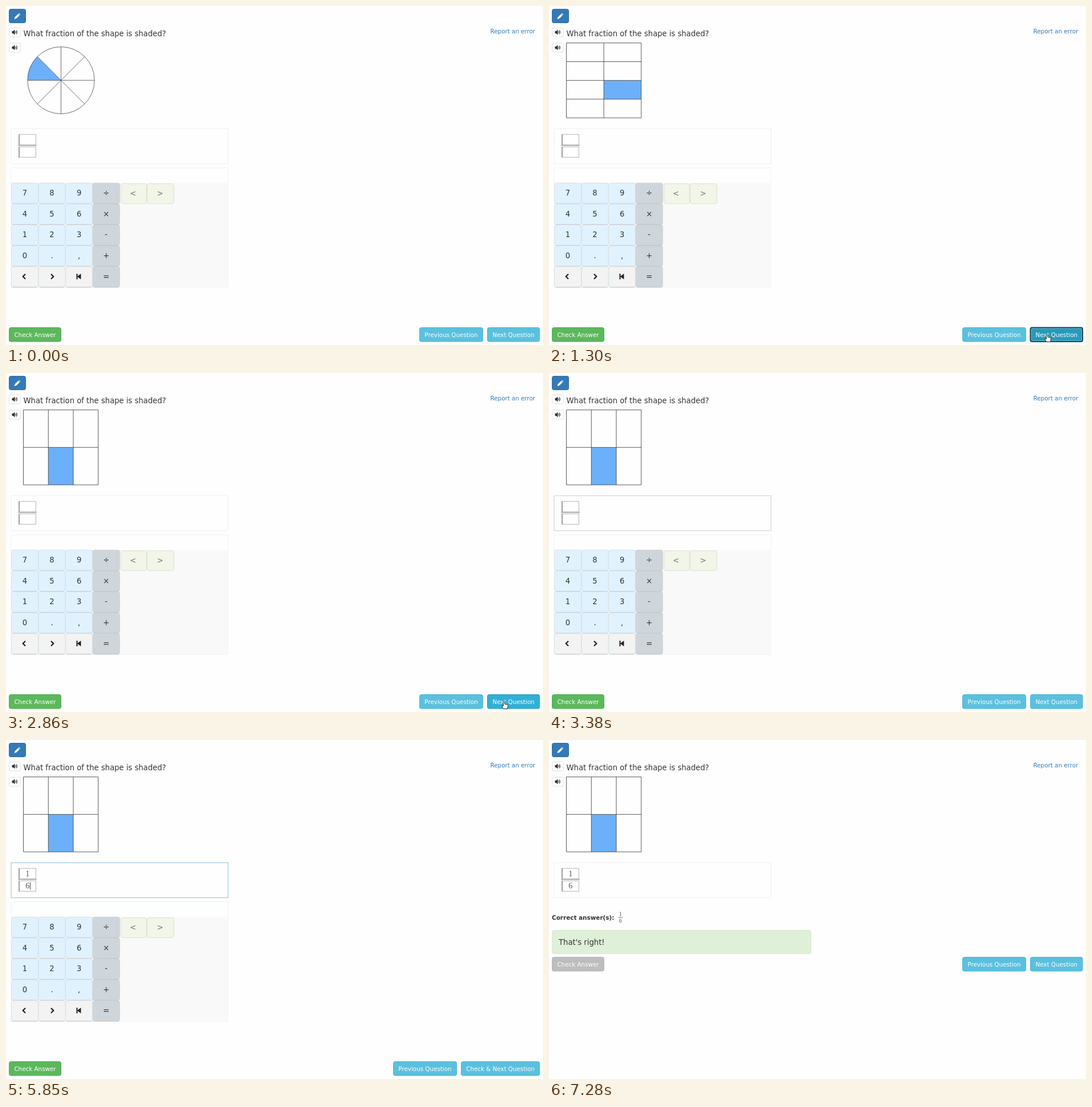
Write an HTML page that moves like this. It is 942x594 px and loops after 7540 ms.

```html
<!DOCTYPE html>
<html lang="en">
<head>
<meta charset="utf-8">
<title>Fraction practice</title>
<style>
  html, body { margin: 0; width: 100%; height: 100%; overflow: hidden; background: #fefefe; }
  svg { display: block; width: 942px; height: 594px; }
  text { font: 13.2px "DejaVu Sans", sans-serif; fill: #333; white-space: pre; }
  .small { font-size: 10.35px; }
  .bold { font-size: 10.45px; font-weight: bold; }
  .math { font-family: "Liberation Serif", serif; font-size: 14px; fill: #555; }
  .tiny { font-size: 10px; }
</style>
</head>
<body>
<svg id="stage" viewBox="0 0 942 594"></svg>
<script>
const LOOP = 7540, STEP = 130;
const stage = document.getElementById('stage');

const rect = (x, y, w, h, fill, stroke = 'none', r = 0, line = 1) =>
  `<rect x="${x}" y="${y}" width="${w}" height="${h}" rx="${r}" fill="${fill}" stroke="${stroke}" stroke-width="${line}"/>`;
const path = (d, fill = 'none', stroke = 'none', line = 1) =>
  `<path d="${d}" fill="${fill}" stroke="${stroke}" stroke-width="${line}" stroke-linejoin="round"/>`;
const text = (s, x, y, cls = '', fill = '', anchor = 'start') =>
  `<text x="${x}" y="${y}" class="${cls}" text-anchor="${anchor}" ${fill && `style="fill:${fill}"`}>${s.replace('&', '&amp;').replace('<', '&lt;')}</text>`;
const centered = (s, x, y, cls, fill) => text(s, x, y, cls, fill, 'middle');
const at = (x, y, body) => `<g transform="translate(${x} ${y})">${body}</g>`;

const INK = '#484848', SHADE = '#6cb0f9';

function pie(parts, shaded) {
  const cx = 96.5, cy = 130.2, r = 58.7;
  const rim = i => {
    const a = i * 2 * Math.PI / parts;
    return `${cx + r * Math.cos(a)} ${cy + r * Math.sin(a)}`;
  };
  let out = path(`M${cx} ${cy}L${rim(shaded)}A${r} ${r} 0 0 1 ${rim(shaded + 1)}Z`, SHADE);
  for (let i = 0; i < parts; i++) out += path(`M${cx} ${cy}L${rim(i)}`, 'none', INK, .8);
  return out + `<circle cx="${cx}" cy="${cy}" r="${r}" fill="none" stroke="${INK}" stroke-width=".8"/>`;
}

function grid(cols, rows, col, row) {
  const x = 30.5, y = 64.7, size = 131.3, w = size / cols, h = size / rows;
  let out = rect(x + col * w, y + row * h, w, h, SHADE);
  for (let i = 0; i <= cols; i++) out += path(`M${x + i * w} ${y}v${size}`, 'none', INK, .9);
  for (let i = 0; i <= rows; i++) out += path(`M${x} ${y + i * h}h${size}`, 'none', INK, .9);
  return out;
}

const SPEAKER = path('M0 -2H2L5 -4.5V4.5L2 2H0Z', '#333') +
  path('M6.2 -2Q7.6 0 6.2 2M7.6 -3.3Q10.2 0 7.6 3.3', 'none', '#333', 1.1);

function header() {
  const pencil = path('M-5 5L-4 1.5L1.6 -4L4.2 -1.4L-1.5 4ZM2.3 -4.7L3.4 -5.5L5.6 -3.3L4.9 -2.1Z', '#fff');
  const sound = y => rect(5.5, y, 20, 16, '#fff', '#e2e2e2', 2.5) + at(10.5, y + 8, SPEAKER);
  return rect(5.5, 5.5, 29, 24, '#337ab7', '#2e6da4', 3) + at(19.5, 18, pencil) +
    sound(38) + sound(65) +
    text('What fraction of the shape is shaded?', 30.5, 52.5) +
    text('Report an error', 849.5, 48.3, 'small', '#337ab7');
}

function answerBox(border, top, bottom, caret) {
  const slot = (y, value) => rect(23, y, 29.3, 18.3, '#fff', '#aaa', 0, .9) +
    path(`M23 ${y}v18.3`, 'none', '#666') + centered(value, 37.7, y + 13.6, 'math');
  const caretX = caret && (caret === 'top' ? top : bottom) ? 42.5 : 37.5;
  return rect(9, 215, 380.5, 61.3, '#fefefe', border) +
    slot(225, top) + slot(246.8, bottom) + path('M21 244.3h33', 'none', '#777', .8) +
    (caret ? path(`M${caretX} ${caret === 'top' ? 227.5 : 249.3}v13`, 'none', '#333', .9) : '');
}

function keypad() {
  let out = rect(9, 283.8, 380.5, 209.7, '#fefefe', '#f1f1f1') + rect(9.5, 310, 380, 183.5, '#f9f9f9');
  ['789÷', '456×', '123-', '0.,+', '   ='].forEach((row, j) => [...row].forEach((label, i) => {
    const x = 9.5 + i * 47.6, y = 310.2 + j * 36.6;
    const fill = i === 3 ? '#cfd6db' : j === 4 ? '#f3f3f3' : '#e0f2fe';
    out += rect(x, y, 47, 36, fill, i === 3 ? '#c3c9ce' : '#d2dce2', 3, .8) +
      path(`M${x + 2} ${y + 36.1}h43`, 'none', '#bbb', .8) +
      centered(label, x + 23.4, y + 22);
  }));
  ['<', '>'].forEach((label, i) => {
    out += rect(201.8 + i * 46, 311.5, i ? 46.5 : 44.7, 34.7, '#f2f6e8', '#dadfcd', 3) +
      centered(label, 222.8 + i * 47.5, 333, '', '#777');
  });
  const chevron = 'M-2 -4.3L2.4 0L-2 4.3';
  return out + at(32, 474, `<g transform="scale(-1 1)">${path(chevron, 'none', '#222', 2.3)}</g>`) +
    at(81, 474, path(chevron, 'none', '#222', 2.3)) +
    at(127.5, 474, path('M-4 -5h2v4.5L4 -5V5L-2 .5V5h-2Z', '#222'));
}

const BLUE = { idle: ['#5bc0de', '#46b8da'], hover: ['#31b0d5', '#269abc'], down: ['#269abc', '#173f50'] };
const GREEN = { idle: ['#5cb85c', '#4cae4c'], hover: ['#449d44', '#398439'], down: ['#398439', '#102a10'], off: ['#bdbdbd', '#b8b8b8'] };

function button(label, x, y, w, colors, mode = 'idle') {
  const [fill, border] = colors[mode], down = mode === 'down';
  return rect(x + .5, y + .5, w - 1, 24.5, fill, border, 3, down ? 2 : 1) +
    (down ? rect(x + 2, y + 2, w - 4, 21.5, 'none', '#ffffff80', 2, .7) : '') +
    centered(label, x + w / 2, y + 16.8, 'small', '#fff');
}

const HAND = path('M-1.2 1Q0 -.8 1.2 1V5.5L5.8 6.5Q7.3 7 7 9L6 14H-.5L-4 9.5Q-4 7.7 -1.2 9Z', '#fff', '#111', .9);
const ARROW = path('M0 0V12L2.8 9.5L4.7 14L6.6 13.2L4.7 8.8H8.4Z', '#fff', '#111', .9);

// Pointer trips: start, end, from, to, and the time it stays until.
const TRIPS = [
  [520, 1040, [884, 604], [873.5, 574.5], 2860],
  [2860, 3380, [873.5, 574.5], [200, 246], 3380],
  [5980, 6370, [130, 290], [94, 570], 6890],
  [6890, 7280, [94, 570], [150, 604], 7280],
];

function pointer(t) {
  const trip = TRIPS.find(([start, , , , until]) => t >= start && t < until);
  if (!trip) return '';
  const [start, end, from, to] = trip;
  const p = Math.min(1, (t - start) / (end - start)), e = p * p * (3 - 2 * p);
  const [x, y] = from.map((v, i) => v + (to[i] - v) * e);
  const overButton = y > 563 && y < 588 && (x > 844 || x < 97) && t < 6760;
  return at(x, y, overButton ? HAND : ARROW);
}

function scene(t) {
  const within = (a, b) => t >= a && t < b;
  const done = t >= 6760, answered = within(5850, 6760);

  const shape = t < 1300 ? pie(8, 4) : t < 1820 ? grid(2, 4, 1, 2) :
    t < 2340 ? grid(1, 7, 0, 6) : grid(3, 2, 1, 1);

  const border = within(3510, 6500) ? '#8fbbd8' : within(3380, 3510) ? '#ccc' : '#efefef';
  const caret = within(5720, 6500) ? 'bottom' :
    within(3640, 4160) || within(4290, 4810) || within(5330, 5720) ? 'top' : '';

  const nextMode = within(1300, 1430) || within(1690, 1950) || within(2340, 2470) ? 'down' :
    within(780, 2990) ? 'hover' : 'idle';
  const checkMode = done ? 'off' : within(6500, 6630) ? 'down' : within(6370, 6760) ? 'hover' : 'idle';
  const y = done ? 380 : 563;

  const result = () => text('Correct answer(s):', 5, 314.7, 'bold') +
    centered('1', 125.3, 307.5, 'math tiny') + centered('6', 125.3, 320, 'math tiny') +
    path('M121.5 310.7h8', 'none', '#555', .8) +
    rect(5.5, 333.5, 454, 41, '#dff0d8', '#d6e9c6', 3) + text("That's right!", 17, 358.7);

  return header() + shape +
    answerBox(border, t >= 4290 ? '1' : '', t >= 5850 ? '6' : '', caret) +
    (done ? result() : keypad()) +
    button('Check Answer', 5, y, 92, GREEN, checkMode) +
    button('Previous Question', answered ? 679 : 725, y, 112, BLUE) +
    (answered ? button('Check & Next Question', 798, y, 138.5, BLUE)
              : button('Next Question', 844, y, 92.5, BLUE, nextMode)) +
    pointer(t);
}

let shown = -1;
function tick() {
  const t = Math.floor(performance.now() % LOOP / STEP) * STEP;
  if (t !== shown) stage.innerHTML = scene(shown = t);
  requestAnimationFrame(tick);
}
tick();
</script>
</body>
</html>
```
